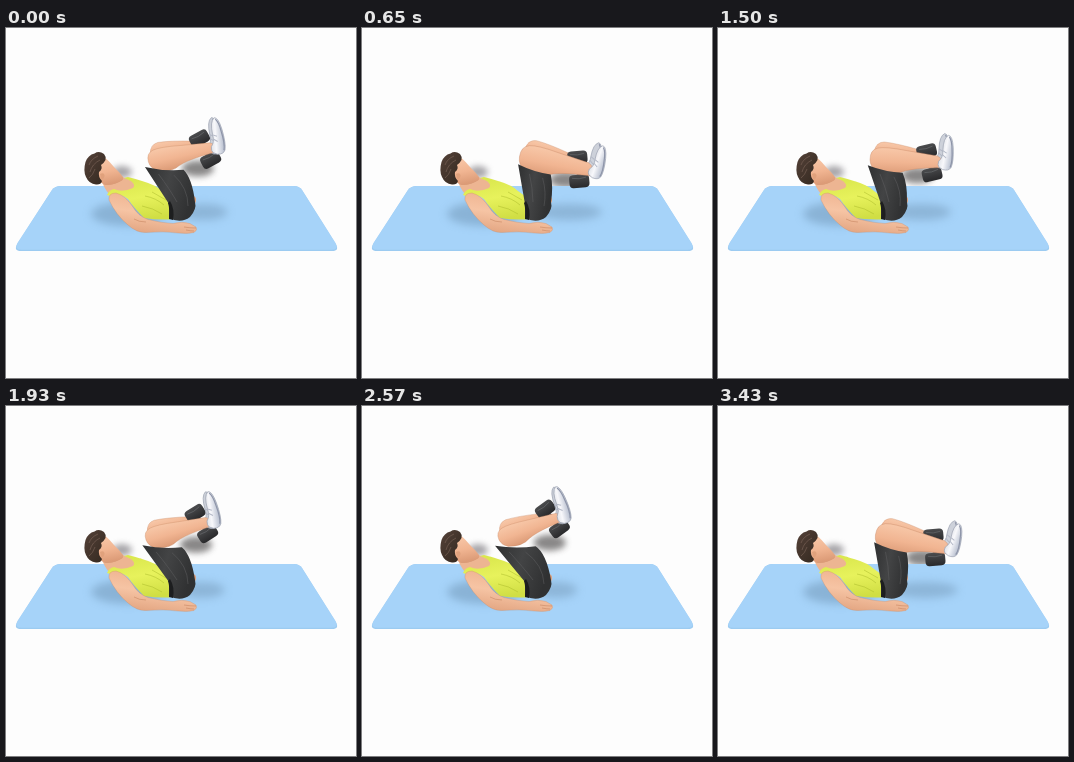
An HTML page for the animation above (3450 ms loop, 350x350 px).

```html
<!DOCTYPE html>
<html lang="en">
<head>
<meta charset="utf-8">
<title>Dumbbell leg raise</title>
<style>
  html, body { margin: 0; width: 100%; height: 100%; overflow: hidden; background: #fdfdfd; }
  svg { display: block; width: 100%; height: 100%; }
</style>
</head>
<body>
<svg viewBox="0 0 350 350">
  <defs>
    <linearGradient id="skin" x1="0" y1="0" x2=".2" y2="1">
      <stop offset="0" stop-color="#f8c9aa"/>
      <stop offset=".55" stop-color="#f1b592"/>
      <stop offset="1" stop-color="#dc9b77"/>
    </linearGradient>
    <linearGradient id="armSkin" x1=".6" y1="0" x2=".3" y2="1">
      <stop offset="0" stop-color="#eeb18d"/>
      <stop offset=".5" stop-color="#f6c4a4"/>
      <stop offset="1" stop-color="#e2a480"/>
    </linearGradient>
    <linearGradient id="shirt" x1=".3" y1="0" x2=".55" y2="1">
      <stop offset="0" stop-color="#d9e64c"/>
      <stop offset=".5" stop-color="#e7f25c"/>
      <stop offset="1" stop-color="#d0de44"/>
    </linearGradient>
    <linearGradient id="cloth" x1="0" y1="0" x2="1" y2=".3">
      <stop offset="0" stop-color="#2f3031"/>
      <stop offset=".5" stop-color="#434445"/>
      <stop offset="1" stop-color="#303132"/>
    </linearGradient>
    <linearGradient id="iron" x1="0" y1="0" x2="0" y2="1">
      <stop offset="0" stop-color="#4b4c4e"/>
      <stop offset="1" stop-color="#29292b"/>
    </linearGradient>
    <linearGradient id="leather" x1="0" y1="0" x2="1" y2=".2">
      <stop offset="0" stop-color="#d6d9e0"/>
      <stop offset=".5" stop-color="#f8f8fb"/>
      <stop offset="1" stop-color="#bcc3d2"/>
    </linearGradient>
    <linearGradient id="hair" x1="0" y1="0" x2="1" y2="1">
      <stop offset="0" stop-color="#554239"/>
      <stop offset="1" stop-color="#33281f"/>
    </linearGradient>
    <filter id="blur" x="-50%" y="-90%" width="200%" height="280%"><feGaussianBlur stdDeviation="4"/></filter>
    <filter id="soft" x="-50%" y="-90%" width="200%" height="280%"><feGaussianBlur stdDeviation="3"/></filter>
    <g id="bell">
      <rect x="-10" y="-6.500" width="20" height="13" rx="4" fill="url(#iron)"/>
      <path d="M-7 -3.500Q0 -1.500 7 -3.500" fill="none" stroke="#606265" stroke-width=".8"/>
    </g>
    <g id="shoe">
      <path d="M-1 -34Q3 -34 5 -22Q7 -8 5 -2Q3 2 -3 1L-7 -1Q-9 -3 -8 -7Q-4 -11 -5 -18Q-6 -31 -1 -34Z" stroke="#a0a6b4" stroke-width=".7"/>
      <path d="M0 -32.500Q3 -29 4 -20Q6 -8 4 -2" fill="none" stroke="#8d94a8" stroke-width="1.200"/>
      <path d="M-5 -14L-1 -11M-5 -18L-1 -16" fill="none" stroke="#b3b8c6"/>
    </g>
  </defs>

  <ellipse id="wallShade" rx="16" ry="8" fill="#4c4848" opacity=".65" filter="url(#soft)"/>
  <ellipse cx="116" cy="144" rx="10" ry="6" fill="#77757a" opacity=".65" filter="url(#soft)"/>

  <!-- mat -->
  <path d="M55 158H288Q293 158 296 162L329.500 215.500Q334 223 326 223H15Q7 223 11.500 215.500L46 162Q49 158 55 158Z" fill="#9ccbf1"/>
  <path d="M55 158H288Q293 158 296 162L329.500 215Q333 221.800 326 221.800H15Q8 221.800 11.500 215L46 162Q49 158 55 158Z" fill="#a6d3f9"/>
  <ellipse cx="122" cy="186" rx="37" ry="12" fill="#6d93b3" opacity=".5" filter="url(#blur)"/>
  <ellipse id="matShade" cy="184" ry="8" fill="#7398b8" opacity=".5" filter="url(#blur)"/>

  <ellipse cx="186.500" cy="172" rx="3.500" ry="4" fill="#dfa07b"/>

  <!-- lower legs, drawn along the shin from the knee -->
  <g id="shin">
    <path d="M0 2Q1 -7 9 -8Q22 -8 45 -4L60 2V8L20 10Z" fill="url(#skin)" stroke="#c58561" stroke-opacity=".5" stroke-width=".6"/>
    <g id="weight">
      <path d="M50 -7L58 15.500" stroke="#77797d" stroke-width="4"/>
      <use href="#bell" transform="translate(50 -7) rotate(-20)"/>
      <use href="#bell" transform="translate(58 15.500) rotate(-20)"/>
    </g>
    <use id="farShoe" href="#shoe" fill="#cdd1da"/>
    <path id="calf" d="M-3 9Q-4 1 3 -1Q10 -3 30 -1.500L58 0Q65 2 63 9Q56 10 48 11Q34 13 26 16.500Q18 22 4 18Q-2 15 -3 9Z" fill="url(#skin)" stroke="#c58561" stroke-opacity=".5" stroke-width=".6"/>
    <use id="nearShoe" href="#shoe" fill="url(#leather)"/>
  </g>

  <!-- neck, chest and shirt -->
  <path d="M96 154Q106 154 112 147L119 150L128 153Q134 158 131 165L106 169Q100 164 96 154Z" fill="#edb592"/>
  <path d="M99 156Q109 157 116 151" fill="none" stroke="#c58762" stroke-width="1.500" opacity=".6"/>
  <path d="M101 167Q103 162 108 161Q116 165 127 160Q130 157 125 153L118 150L122 149Q130 151 136 153Q150 157 156 163L167 171L164 191.500Q150 192 138 190Q128 180 122 171Q112 164 104 168Z" fill="url(#shirt)"/>
  <path d="M139 168Q150 170 158 177M136 178Q147 180 156 186M146 164Q153 168 160 172" fill="none" stroke="#a9b92b" opacity=".5"/>

  <!-- head -->
  <path d="M93 134Q96 129 100 130.500Q104 134 108 139L113 144L117 149Q118 152 114 153.500Q106 157 99 157L91 152Z" fill="url(#skin)"/>
  <path d="M98 126Q93 122.500 88.500 125.500Q82 127 79.500 134Q77 143 80 149Q83 156 90 156.500Q95 157 96 153Q92 149 93 144Q97 141 95 137Q98 135 99.500 132Q100 128 98 126Z" fill="url(#hair)"/>
  <path d="M94 146Q98 144 98.500 147.500Q98 151.500 95.500 151.500Z" fill="#e0a17c"/>
  <path d="M83 137Q85 131 92 128M84 144Q86 136 94 132M83 150Q87 147 89 141" fill="none" stroke="#7d675a" opacity=".6"/>

  <path id="shorts" fill="url(#cloth)"/>
  <path id="folds" fill="none" stroke="#606163" opacity=".5"/>
  <path d="M164 173Q169 181 167 192L163 191Q164 181 162 175Z" fill="#1d1e1f"/>

  <path d="M103 172Q102 165 110 165Q119 167 127 179Q132 188 142 191.500Q156 195 167 195.500Q176 193 184 195.500L190 199Q192 202 188 204.500Q182 206 172 205Q158 203 140 204.500Q131 205 122 197Q110 187 103 172Z" fill="url(#armSkin)" stroke="#c58561" stroke-opacity=".5" stroke-width=".6"/>
  <path d="M178 199Q184 200 190 200M180 202Q185 203 188 203M128 191Q133 194 140 194" fill="none" stroke="#bf7d58" stroke-width=".7" opacity=".7"/>
</svg>
<script>
const $ = id => document.getElementById(id);
const LOOP = 3450, STEP = 214.4;   // ms
const CYCLE = 13, LOWEST = 4.3;    // in steps

const mix = (a, b, k) => a + (b - a) * k;
const between = (p, q, k, dx = 0, dy = 0) => [mix(p[0], q[0], k) + dx, mix(p[1], q[1], k) + dy];
const pose = (id, value) => $(id).setAttribute("transform", value);

// 0 = feet up over the body, 1 = feet lowered.
function swing(step) {
  const a = 2 * Math.PI * (step - LOWEST) / CYCLE;
  return .506 + .536 * Math.cos(a) - .042 * Math.cos(2 * a);
}

function draw(s) {
  const knee = between([136, 124], [166, 117], s, 0, 8 * s * (1 - s));
  pose("shin", `translate(${knee}) rotate(${mix(-18, 17.6, s)})`);
  pose("calf", `scale(${1 + .13 * s} ${1 + .35 * s})`);
  pose("weight", `translate(${3 * s} ${5 * s})`);

  const heel = [67 + 9 * s, 11 + 1.5 * s], size = `scale(1 ${1.08 - .13 * s})`;
  pose("nearShoe", `translate(${heel}) ${size}`);
  pose("farShoe", `translate(${heel[0] - 2 - 3 * s} ${heel[1] - 2 * s}) ${size}`);

  const front = between([132, 140], [158, 136], s);
  const back = between([173, 140], [190, 147], s);
  const seat = between([184, 147], [192, 160], s);
  $("shorts").setAttribute("d", `M${front}L163 176V190Q175 196 184 189Q191 181 189 174
    Q${seat} ${back}Q${between(front, back, .5, 0, 3)} ${front}Z`);
  $("folds").setAttribute("d", `M${between(front, back, .35, 0, 6)}Q${between(front, [172, 176], .6, 5)} 171 174
    M${between(front, back, .75, 0, 6)}Q${between(seat, [178, 170], .5)} 182 178`);

  $("wallShade").setAttribute("cx", 187 + 18 * s);
  $("wallShade").setAttribute("cy", 136 + 17 * s);
  $("matShade").setAttribute("cx", 194 + 14 * s);
  $("matShade").setAttribute("rx", 20 + 14 * s);
}

let start;
function tick(now) {
  start ??= now;
  const t = (now - start) % LOOP;
  draw(swing(Math.floor((t + 8) / STEP)));
  requestAnimationFrame(tick);
}
draw(swing(0));
requestAnimationFrame(tick);
</script>
</body>
</html>
```
